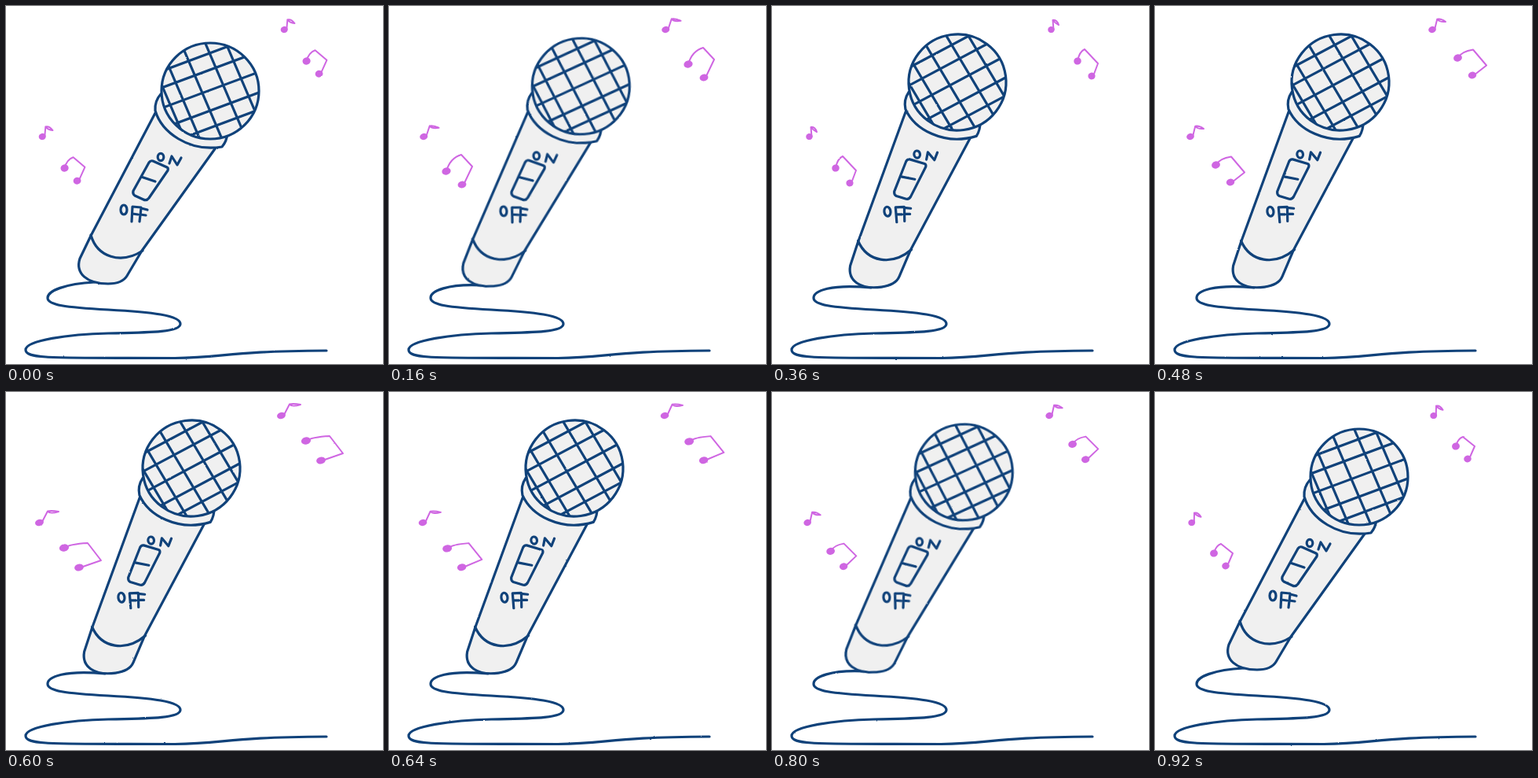
Recreate the animation shown at these times as an HTML page. Size 480x455 px, loop 960 ms.

```html
<!DOCTYPE html>
<html lang="en">
<head>
<meta charset="utf-8">
<title>Singing microphone</title>
<style>
  html, body { margin: 0; width: 100%; height: 100%; overflow: hidden; background: #fff; }
  svg { display: block; width: 100vw; height: 100vh; }
  .ink { fill: none; stroke: #10427a; stroke-width: 3.2; stroke-linecap: round; stroke-linejoin: round; }
  .skin { fill: #f0f0f0; }
  .note { fill: none; stroke: #cf66e2; stroke-width: 2; stroke-linecap: round; stroke-linejoin: round; }
  .note ellipse { fill: #cf66e2; stroke: none; }
</style>
</head>
<body>
<svg viewBox="0 0 480 455" preserveAspectRatio="none">
  <defs>
    <filter id="rough" filterUnits="userSpaceOnUse" x="0" y="0" width="480" height="455" color-interpolation-filters="sRGB">
      <feTurbulence id="grain" type="fractalNoise" baseFrequency=".25" numOctaves="1" seed="1"/>
      <feDisplacementMap in="SourceGraphic" scale="1.7" xChannelSelector="R" yChannelSelector="G"/>
    </filter>
    <clipPath id="ball"><ellipse cx="260" cy="108" rx="62" ry="61"/></clipPath>
  </defs>
  <g filter="url(#rough)">
    <path id="cable" class="ink"/>
    <!-- Drawn upright around the head centre 260 108, then posed -->
    <g id="mic" class="ink">
      <path class="skin" d="M190 136 L108 292 L94 321 C88 340 103 353 130 353 Q148 353 154 343 L173 311 L270 176 Z"/>
      <path d="M108 291 C116 319 146 329 174 311"/>
      <path class="skin" d="M197 112 Q189 121 190 133 C198 160 232 186 275 179 Q281 172 282 162 Z"/>
      <ellipse class="skin" cx="260" cy="108" rx="62" ry="61"/>
      <path id="mesh" clip-path="url(#ball)"/>
      <path d="M187 197 L205 205 Q207 206 206 209 L182 244 Q179 248 175 246 L164 241 Q161 239 162 235 L182 199 Q184 196 187 197 Z M172 217 L190 223"/>
      <g aria-label="ON">
        <ellipse cx="197" cy="192" rx="3.8" ry="4.6"/>
        <path d="M208 200 L211 191 L218 202 L223 193"/>
      </g>
      <g aria-label="OFF">
        <ellipse cx="150" cy="259" rx="4" ry="6"/>
        <path d="M160 274 L161 255 L172 256 M161 264 L168 265 M170 274 L172 257 L180 259 M171 265 L178 266"/>
      </g>
    </g>
    <g id="right" class="note"></g>
    <g id="left" class="note" transform="translate(-308 136)"></g>
  </g>
</svg>
<script>
const LOOP = 960, STEP = 40, HOLD = 120;
const $ = id => document.getElementById(id);

// Evenly turned lines on a sphere, so they crowd towards the rim
function meshPath() {
  const offset = degrees => 64 * Math.sin(degrees * Math.PI / 180);
  let d = '';
  for (let i = -2; i <= 2; i++) {
    const x = 260 + offset(i * 28 - 10), y = 108 + offset(i * 24 - 1);
    d += `M${x - 30} 38 L${x + 30} 178 M190 ${y + 26} L330 ${y - 26}`;
  }
  return d;
}
$('mesh').setAttribute('d', meshPath());

const poses = [
  { head: '260 108', tilt: 0, plug: '113 351' },
  { head: '244.3 102', tilt: -4.3, plug: '117 355' },
  { head: '236 97', tilt: -7.6, plug: '126 358' }
];
const order = [0, 1, 1, 2, 2, 2, 1, 0];
const cable = plug => `M${plug} C75 353 53 362 53 371 S75 383 130 386 S222 393 222 404
  S180 415 130 416 S25 425 25 437 S60 447 215 447.5 C280 447 280 438.5 408 438`;

// Key shapes of the notes: quaver stretch, and the pair as head, top, top, head
const shapes = [
  { at: -40, stretch: .15, pair: [383, 69, 392, 57, 407, 69, 398, 85] },
  { at: 160, stretch: .65, pair: [381, 74, 400, 53, 414, 68, 401, 91] },
  { at: 360, stretch: 0, pair: [389, 70, 398, 55, 415, 73, 407, 89] },
  { at: 600, stretch: 1, pair: [382, 62, 412, 56, 429, 78, 401, 87] }
];
shapes.push({ ...shapes[0], at: LOOP - 40 }, { ...shapes[1], at: LOOP + 160 });

const mix = (a, b, f) => a + (b - a) * f;

function shapeAt(t) {
  const i = shapes.findIndex(s => s.at > t), a = shapes[i - 1], b = shapes[i];
  const f = (t - a.at) / (b.at - a.at);
  return {
    stretch: mix(a.stretch, b.stretch, f),
    pair: a.pair.map((v, k) => mix(v, b.pair[k], f))
  };
}

// Note heads stand upright when squeezed and lie flat when stretched
function blob(x, y, size, s) {
  const rx = size * (.85 + .25 * s);
  return `<ellipse cx="${x}" cy="${y}" rx="${rx}" ry="${size * .82}" transform="rotate(-12 ${x} ${y})"/>`;
}

function drawNotes({ stretch: s, pair: [ax, ay, bx, by, cx, cy, dx, dy] }) {
  const hx = 355.5 - 5 * s, hy = 30, tx = 357.5 + 3.5 * s, ty = 18 - 2.5 * s;
  const fx = 365 + 10 * s, fy = 24 - 8 * s;
  const quaver = `M${hx + 3} ${hy} L${tx} ${ty} Q${tx + 3} ${ty + 4} ${fx} ${fy} Q${tx + 5} ${ty - 1} ${tx} ${ty}`;
  const pair = `M${ax} ${ay} Q${mix(ax, bx, .25)} ${mix(ay, by, .8)} ${bx} ${by} L${cx} ${cy} L${dx + 2} ${dy}`;
  return blob(hx, hy, 5, s) + blob(ax, ay, 5.6, s) + blob(dx, dy, 5.4, s) +
    `<path d="${quaver} ${pair}"/>`;
}

let shown = -1;
function draw(now) {
  const step = Math.floor(now % LOOP / STEP);
  if (step === shown) return;
  shown = step;
  const t = step * STEP, pose = poses[order[Math.floor(t / HOLD)]];
  $('mic').setAttribute('transform', `translate(${pose.head}) rotate(${pose.tilt}) translate(-260 -108)`);
  $('cable').setAttribute('d', cable(pose.plug));
  $('right').innerHTML = $('left').innerHTML = drawNotes(shapeAt(t));
  $('grain').setAttribute('seed', step + 1);
}

const start = performance.now();
function tick() {
  draw(performance.now() - start);
  requestAnimationFrame(tick);
}
tick();
</script>
</body>
</html>
```
